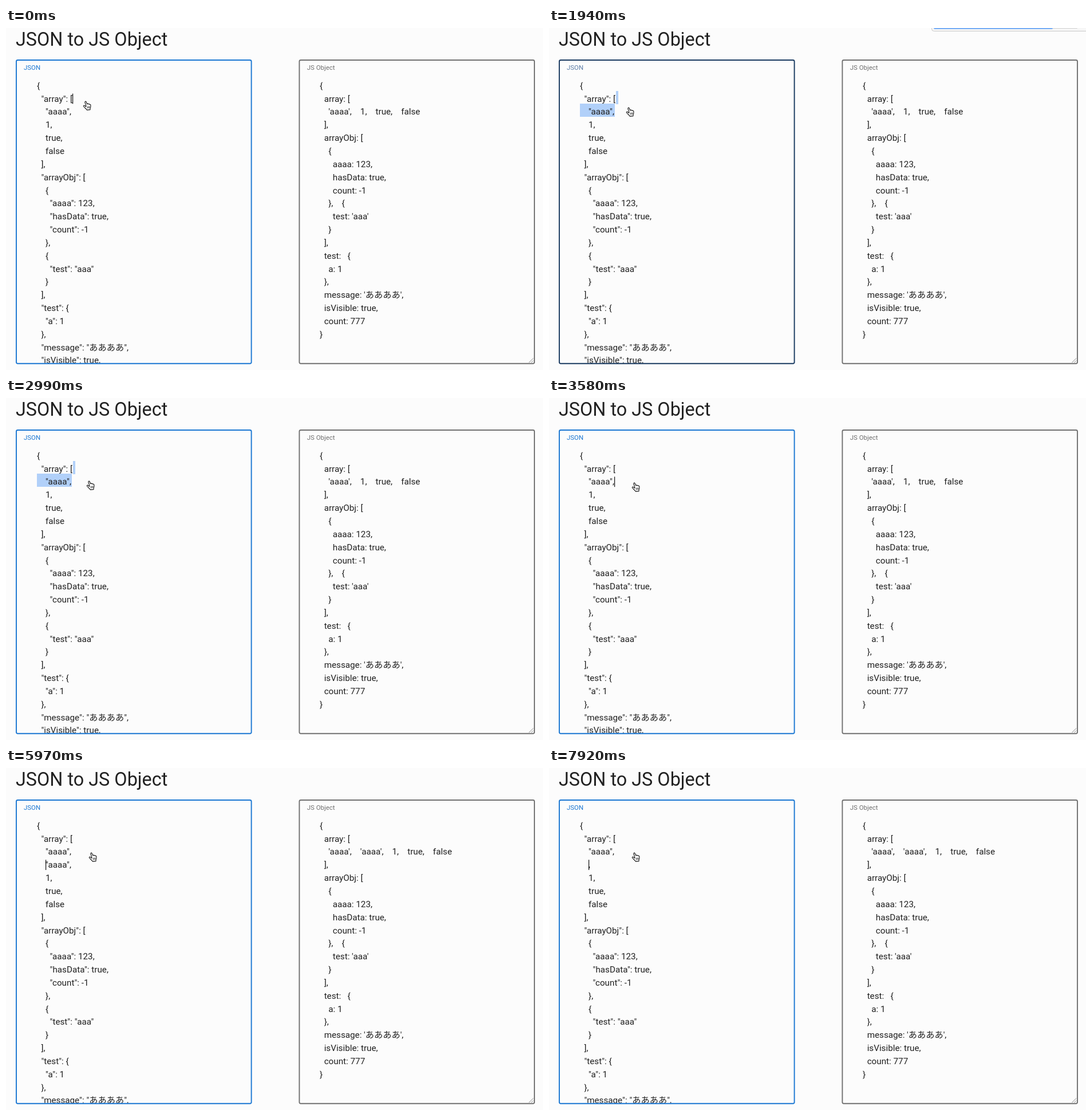
An HTML page that plays this animation: 938x597 px, repeating every 8 s.

```html
<!DOCTYPE html>
<html lang="ja">
<head>
<meta charset="utf-8">
<title>JSON to JS Object</title>
<style>
  html, body { margin: 0; width: 100%; height: 100%; overflow: hidden; background: #fcfcfc; }
  svg { display: block; width: 938px; height: 597px; }
  text { font-family: Roboto, "Noto Sans CJK JP", "Noto Sans CJK", sans-serif; white-space: pre; fill: #212121; }
  .code { font-size: 15.23px; }
  .label { font-size: 11.42px; fill: #707070; }
  .panel { fill: none; stroke: #707070; stroke-width: 1.9px; }
  .mark { fill: #b1d0f9; }
</style>
</head>
<body>
<svg viewBox="0 0 938 597">
  <defs>
    <clipPath id="view"><rect x="19" y="80" width="904" height="504.8"/></clipPath>
  </defs>

  <text x="17" y="31" font-size="32.38">JSON to JS Object</text>

  <g id="marks"></g>
  <g clip-path="url(#view)">
    <g id="json" class="code"></g>
    <g id="object" class="code"></g>
  </g>
  <rect id="caret" width="1.2" height="17.8" fill="#111"/>

  <rect id="box" class="panel" x="18" y="56" width="410.6" height="529.8" rx="2.5"/>
  <text id="label" class="label" x="31" y="73.3">JSON</text>
  <rect class="panel" x="512.4" y="56" width="410.6" height="529.8" rx="2.5"/>
  <text class="label" x="525.8" y="73.3">JS Object</text>
  <path d="M913.5 584 L921 576.5 M917.5 584 L921 580.5" stroke="#777" stroke-width=".9"/>

  <g id="find">
    <rect x="668.5" y="-50" width="290" height="49.5" rx="4" fill="#f6f6f6" stroke="#cacaca"/>
    <rect x="673.5" y="-30" width="205" height="24.5" fill="#fff" stroke="#a9a9a9"/>
    <path d="M879 -5.5 H922.5 V-30 M901 -5.5 V-30" fill="#f0f0f0" stroke="#d0d0d0"/>
    <path d="M887 -15 l5 4 M911 -11 l5 -4" stroke="#bbb" fill="none"/>
    <text x="677" y="-8.3" font-size="13">multi</text>
    <circle cx="934.5" cy="-14" r="6" fill="#e0524d"/>
    <rect id="ring" x="673" y="-30" width="206" height="25" rx="1" fill="none" stroke="#78aef5" stroke-width="2"/>
  </g>

  <g id="hand" stroke="#111" stroke-width="1.1" stroke-linejoin="round" stroke-linecap="round">
    <path fill="#fff" d="M5.4 8.6 L3.4 3 C2.9 1.2 4.9 .4 5.6 2 L7.2 5.7 C8 4.8 9.1 5 9.4 5.9 C10.2 5.2 11.1 5.5 11.4 6.5 C12.5 6 13.3 6.6 13.4 7.8 C13.6 10 13.5 11.5 12.5 13.4 L12.5 15.6 L6.7 16.1 C6 14 2.6 12.2 1 9.8 C.3 8.5 1.7 7.7 2.9 8.5 L5 10.4 Z"/>
    <path fill="none" stroke-width=".8" d="M7.6 10.2 l.3 2.8 M9.5 10 l.2 2.8 M11.3 9.8 l.1 2.8"/>
  </g>
</svg>

<script>
const LOOP = 8000, LINE = 22.84, BASE = 105.8, LEFT = 53.9, RIGHT = 548.1;
const el = id => document.getElementById(id);

const json = ['{', '  "array": [', '    "aaaa",', '    1,', '    true,', '    false', '  ],',
  '  "arrayObj": [', '    {', '      "aaaa": 123,', '      "hasData": true,', '      "count": -1',
  '    },', '    {', '      "test": "aaa"', '    }', '  ],', '  "test": {', '    "a": 1', '  },',
  '  "message": "ああああ",', '  "isVisible": true,'];

const object = ['{', '  array: [', "    'aaaa',    1,    true,    false", '  ],', '  arrayObj: [',
  '    {', '      aaaa: 123,', '      hasData: true,', '      count: -1', '    },    {',
  "      test: 'aaa'", '    }', '  ],', '  test:   {', '    a: 1', '  },',
  "  message: 'ああああ',", '  isVisible: true,', '  count: 777', '}'];

const insert = (rows, row) => [...rows.slice(0, 3), row, ...rows.slice(3, -1)];
const longObject = object.map((row, i) => i === 2 ? row.replace("'aaaa',", "'aaaa',    'aaaa',") : row);

const BLUE = '#1976d2';
// Marks are [x from, x to, row]; the caret is [x, row]
const twoLines = [[117, 121, 1], [54, 115, 2]];
const at = (ms, change) => ({ ms, change });

const steps = [
  at(0, { json, object, caret: [116, 1], marks: [], hand: [134.5, 127],
          border: BLUE, label: BLUE, find: null, ring: true }),
  at(140, { caret: null, marks: twoLines, hand: [134.5, 138] }),
  at(1940, { border: '#17385f', label: '#5a7ba6', find: 6 }),
  at(2090, { border: '#1a1a1a', label: '#707070', find: 13 }),
  at(2690, { find: 12, ring: false }),
  at(2840, { border: '#1a5591', label: '#4373a4', find: null }),
  at(2990, { border: BLUE, label: BLUE, hand: [140.5, 144] }),
  at(3140, { hand: [144.7, 149.3] }),
  at(3280, { hand: [144.5, 147] }),
  at(3580, { marks: [], caret: [114, 2] }),
  at(4030, { json: insert(json, '    "aaaa",'), object: longObject, caret: [114, 3] }),
  at(4480, { caret: null }),
  ...[[4930, 111], [5080, 107], [5380, 99], [5530, 90], [5670, 82], [5820, 74], [5970, 69]]
    .map(([ms, x]) => at(ms, { caret: [x, 3] })),
  at(6270, { caret: null, marks: [[69, 114.5, 3]] }),
  at(6420, { marks: [[69, 111.5, 3]] }),
  at(6870, { json: insert(json, '    ,'), marks: [], caret: [69, 3] }),
  at(7470, { caret: null }),
  at(7920, { caret: [69, 3] })
];

let acc = {};
const states = steps.map(s => acc = { ...acc, ...s.change });

function make(tag, attrs, text = '') {
  const node = document.createElementNS('http://www.w3.org/2000/svg', tag);
  for (const key in attrs) node.setAttribute(key, attrs[key]);
  node.textContent = text;
  return node;
}

const baseline = row => BASE + row * LINE;
const move = (id, x, y) => el(id).setAttribute('transform', `translate(${x} ${y})`);
const show = (id, on) => { el(id).style.display = on ? '' : 'none'; };

function write(id, x, rows) {
  el(id).replaceChildren(...rows.map((row, i) => make('text', { x, y: baseline(i) }, row)));
}

function draw(s) {
  write('json', LEFT, s.json);
  write('object', RIGHT, s.object);
  el('marks').replaceChildren(...s.marks.map(([from, to, row]) => make('rect',
    { class: 'mark', x: from, y: Math.round(baseline(row) - 19.1), width: to - from, height: 23 })));
  show('caret', s.caret);
  if (s.caret) move('caret', s.caret[0], baseline(s.caret[1]) - 14.1);
  move('hand', ...s.hand);
  el('box').style.stroke = s.border;
  el('label').style.fill = s.label;
  show('find', s.find !== null);
  move('find', 0, s.find || 0);
  show('ring', s.ring);
}

let shown = -1;
function tick() {
  const t = performance.now() % LOOP;
  const now = steps.findLastIndex(s => s.ms <= t);
  if (now !== shown) draw(states[shown = now]);
  requestAnimationFrame(tick);
}
tick();
</script>
</body>
</html>
```
